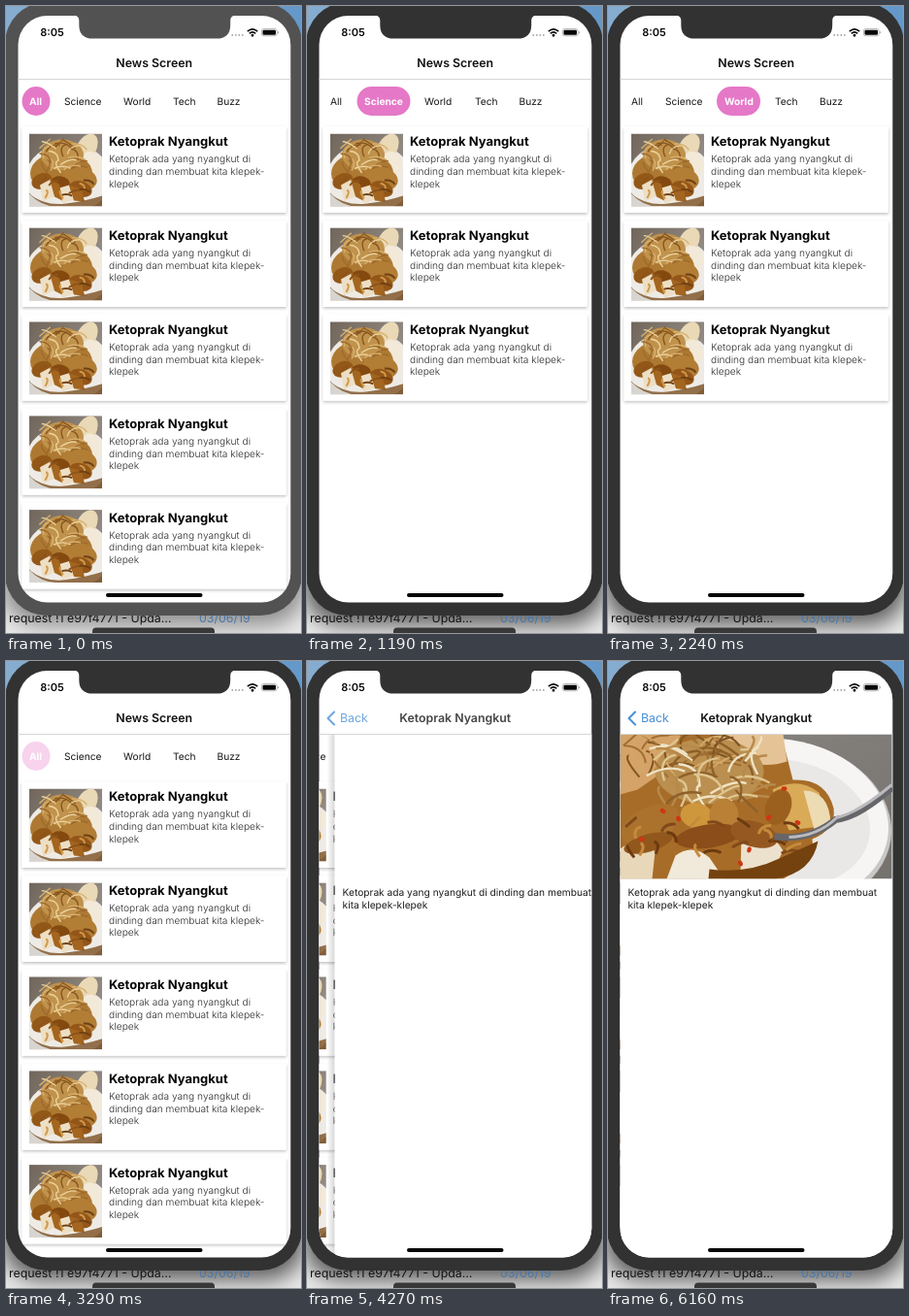
Animation of 304 by 646 pixels, one loop 6230 ms. Source, as an HTML page:

```html
<!DOCTYPE html>
<html lang="id">
<head>
<meta charset="utf-8">
<title>News Screen</title>
<style>
html, body { margin: 0; width: 100%; height: 100%; overflow: hidden; background: #dedede; }
svg { display: block; width: 304px; height: 646px; font-family: Inter, "Liberation Sans", sans-serif; text-rendering: geometricPrecision; }
</style>
</head>
<body>
<svg id="stage" viewBox="0 0 304 646"></svg>
<script>
const LOOP = 6230, STEP = 70;
const LABELS = ['All', 'Science', 'World', 'Tech', 'Buzz'];

// Tab label positions and the pill, per selected tab
const TABS = [
  { x: [24, 60, 121, 172, 217.5], pill: [16.5, 29], cards: 5 },
  { x: [24, 59, 121, 173, 218.5], pill: [51.5, 55], cards: 3 },
  { x: [24, 59, 120, 172, 218], pill: [112, 45], cards: 3 }
];
const TAPS = [
  { tab: 1, down: 700, up: 835 },
  { tab: 2, down: 1330, up: 1465 },
  { tab: 0, down: 3015, up: 3221 }
];
const PUSH = { start: 4038, length: 500, photo: 4760 };

const text = (x, y, size, weight, str, extra = '') =>
  `<text x="${x}" y="${y}" font-size="${size}" font-weight="${weight}" ${extra}>${str}</text>`;
const oval = (x, y, rx, ry, fill, turn = 0) =>
  `<ellipse cx="${x}" cy="${y}" rx="${rx}" ry="${ry}" fill="${fill}" transform="rotate(${turn} ${x} ${y})"/>`;
const each = (n, fn) => Array.from({ length: n }, (_, i) => fn(i)).join('');

// Thin curved strands scattered around a centre
function strands(n, cx, cy, rx, ry, len, width, colors) {
  return each(n, i => {
    const x = cx + rx * Math.sin(i * 2.4), y = cy + ry * Math.cos(i * 1.7);
    const a = i * 1.13, dx = len * Math.cos(a), dy = len * Math.sin(a) * 0.7;
    return `<path d="M${x - dx} ${y - dy}Q${x + dy} ${y - len / 2} ${x + dx} ${y + dy}" fill="none" stroke="${colors[i % colors.length]}" stroke-width="${width}"/>`;
  });
}

const thumb = `
  <rect width="75" height="75" fill="url(#table)"/>
  ${oval(40, 46, 44, 36, '#eeebe6')}
  ${oval(59, 15, 10, 16, '#ead9b6', 28)}
  ${oval(64, 31, 10, 13, '#f2e9d8', -18)}
  ${oval(33, 41, 32, 22, '#ad7932')}
  ${oval(34, 22, 22, 16, '#c0924c')}
  ${oval(52, 46, 18, 12, '#b27d35', 15)}
  ${strands(24, 34, 23, 18, 13, 9, 1.4, ['#ead09a', '#87561f', '#d8b06d', '#9c6a2c'])}
  ${oval(13, 49, 11, 8, '#935818', -20)}
  ${oval(32, 51, 10, 7, '#84490f', 10)}
  ${oval(53, 57, 12, 8, '#945618', 18)}
  <path d="M11 53L22 47L27 64L14 70Z M31 56L41 53L46 68L34 72Z" fill="#eddfc5"/>
  <path d="M21 47L31 52L34 69L26 65Z M41 53L54 57L57 70L46 69Z" fill="#a3651f"/>
  ${strands(9, 38, 56, 24, 8, 6, 2, ['#6f4013', '#cf9a4c', '#8c541b'])}
  <path d="M0 62Q16 75 38 72T75 64V75H0Z" fill="#7c5023" opacity=".8"/>
  <path d="M0 62Q14 77 33 75H0Z" fill="#d8d5d0"/>`;

const photo = `
  <rect width="280" height="149" fill="url(#wood)"/>
  ${oval(166, 93, 114, 87, '#c9c7c5', 8)}
  ${oval(164, 90, 113, 85, '#f6f5f4', 8)}
  ${oval(166, 92, 92, 66, '#eae8e6', 8)}
  <path d="M0 0H166L178 47Q212 45 220 76Q223 98 198 108Q202 130 168 149H0Z" fill="#a76c28"/>
  <path d="M0 0H63L44 39L18 57L0 62Z" fill="#d5a367"/>
  <path d="M98 0H168L172 28Q148 36 126 26Z" fill="#e6c396"/>
  ${oval(92, 38, 56, 34, '#ba8f4f')}
  ${strands(30, 62, 18, 48, 16, 17, 2, ['#7f5422', '#d3a867', '#a06f33'])}
  ${strands(40, 95, 42, 48, 27, 20, 2.4, ['#efe3c4', '#8e602a', '#dfc590', '#b78a4b'])}
  ${oval(31, 93, 32, 18, '#aa722d', -25)}
  ${oval(79, 84, 17, 13, '#cf973c', 12)}
  ${oval(107, 84, 15, 18, '#b98036')}
  <path d="M0 118Q20 103 36 121L33 149H0Z" fill="#e8d7b8"/>
  <path d="M57 125Q74 112 92 127L107 149H48Z" fill="#f1e9d9"/>
  <path d="M125 106Q151 92 168 120L158 140L124 143Z" fill="#ece1cc"/>
  <path d="M157 57Q183 43 205 60L214 94L174 99Z" fill="#d9ab58"/>
  <path d="M189 58Q216 58 217 93L200 98Z" fill="#eddbb3"/>
  ${oval(91, 105, 34, 12, '#8b4d19', -8)}
  ${oval(138, 103, 25, 13, '#945820', 16)}
  ${oval(163, 75, 13, 19, '#9c601e', 20)}
  ${oval(29, 112, 26, 9, '#91571d', -16)}
  ${strands(20, 95, 106, 84, 16, 9, 3, ['#6d3a10', '#c58a3b', '#80491a'])}
  <path d="M92 139Q131 144 164 128L204 110Q198 143 160 149H91Z" fill="#74420f"/>
  <path d="M159 105Q194 111 222 88Q244 86 280 55" fill="none" stroke="#66666a" stroke-width="7"/>
  <path d="M174 106Q204 105 223 86Q247 80 280 52" fill="none" stroke="#b9bbbe" stroke-width="3"/>
  ${each(8, i => oval([22, 44, 60, 133, 153, 169, 183, 124][i], [108, 79, 87, 119, 86, 56, 91, 133][i], 3, 2.2, '#cf3513', i * 35))}`;

const card = i => `
  <g class="card" transform="translate(0 ${i * 96.9})">
    <rect x="16.5" y="124" width="272.5" height="89" rx="1.5" fill="#fff" filter="url(#lift)"/>
    <use href="#thumb" x="24" y="131.5"/>
    ${text(106, 144.3, 13, 700, 'Ketoprak Nyangkut', 'fill="#050505"')}
    <g fill="#2c2c2c">
      ${['Ketoprak ada yang nyangkut di', 'dinding dan membuat kita klepek-', 'klepek']
        .map((line, n) => text(106, 161.2 + n * 12.7, 10.2, 300, line)).join('')}
    </g>
  </g>`;

const stage = document.getElementById('stage');
stage.innerHTML = `
  <defs>
    <linearGradient id="table" x2="1" y2=".6"><stop stop-color="#71665b"/><stop offset="1" stop-color="#98928b"/></linearGradient>
    <linearGradient id="wood" x2="1" y2="1"><stop stop-color="#8a8683"/><stop offset="1" stop-color="#75716d"/></linearGradient>
    <linearGradient id="sky" x2="1"><stop stop-color="#86add0"/><stop offset="1" stop-color="#6498c9"/></linearGradient>
    <linearGradient id="edge"><stop stop-color="#000" stop-opacity="0"/><stop offset="1" stop-color="#000" stop-opacity=".16"/></linearGradient>
    <filter id="lift" x="-5%" y="-10%" width="110%" height="125%"><feDropShadow dx="0" dy="1.6" stdDeviation="1.4" flood-opacity=".24"/></filter>
    <filter id="soft" x="-20%" y="-20%" width="140%" height="140%"><feGaussianBlur stdDeviation="11"/></filter>
    <filter id="blur" x="0" y="0" width="100%" height="100%"><feGaussianBlur stdDeviation=".7"/></filter>
    <clipPath id="screen"><rect x="12.5" y="10" width="280.8" height="604.5" rx="30"/></clipPath>
    <clipPath id="body"><rect x="12" y="76" width="282" height="539"/></clipPath>
    <clipPath id="square"><rect width="75" height="75"/></clipPath>
    <clipPath id="wide"><rect width="281" height="149"/></clipPath>
    <g id="thumb"><g clip-path="url(#square)"><g filter="url(#blur)">${thumb}</g></g></g>
  </defs>
  <rect width="304" height="646" fill="#e9e9e9"/>
  <rect width="304" height="60" fill="url(#sky)"/>
  <rect id="shade" x="-4" y="40" width="312" height="598" rx="40" filter="url(#soft)"/>
  ${text(3, 635.3, 12.4, 400, 'request !1 e97f4771 - Upda…', 'fill="#141414"')}
  ${text(199, 635.3, 12.4, 400, '03/06/19', 'fill="#4777ab"')}
  <rect x="89" y="640.5" width="126" height="12" rx="4" fill="#383838"/>
  <g id="bezel"><rect x="-1" y="-4" width="306" height="632" rx="43"/></g>
  <g clip-path="url(#screen)">
    <rect x="12" y="10" width="282" height="605" fill="#fff"/>
    <g clip-path="url(#body)">
      <g id="list">
        <rect id="pill" y="83" height="30" rx="15" fill="#e578c7"/>
        <g id="tabs">${LABELS.map(name => text(0, 101.6, 10.2, 400, name)).join('')}</g>
        ${each(5, card)}
      </g>
      <g id="detail">
        <rect x="4.5" y="76" width="8" height="540" fill="url(#edge)"/>
        <rect x="12.5" y="76" width="281" height="540" fill="#fff"/>
        <g id="photo" transform="translate(12.5 75.5)" clip-path="url(#wide)"><g filter="url(#blur)">${photo}</g></g>
        <g fill="#1d1d1d">
          ${text(20.5, 242.2, 10.2, 400, 'Ketoprak ada yang nyangkut di dinding dan membuat')}
          ${text(20.5, 254.8, 10.2, 400, 'kita klepek-klepek')}
        </g>
      </g>
    </g>
    <rect x="12" y="75" width="282" height="1" fill="#d6d6d6"/>
    <g text-anchor="middle" fill="#121212">
      ${text(152.7, 63.3, 12.35, 600, 'News Screen', 'id="home"')}
      ${text(152.7, 63.3, 12.35, 600, 'Ketoprak Nyangkut', 'id="title"')}
    </g>
    <g id="back" fill="#468fd8">
      <path d="M28 52.5L21.5 59L28 65.5" fill="none" stroke="#468fd8" stroke-width="2.1" stroke-linecap="round" stroke-linejoin="round"/>
      ${text(34, 63.3, 12.35, 400, 'Back')}
    </g>
    ${text(35.2, 31.1, 11, 600, '8:05', 'fill="#0a0a0a"')}
    <g fill="#a5a5a5">${each(4, i => `<circle cx="${233.3 + i * 3.5}" cy="30" r=".9"/>`)}</g>
    <g fill="none" stroke="#0a0a0a" stroke-width="1.7">
      <path d="M248.8 26.1Q254 21.5 259.2 26.1M250.8 28.3Q254 25.5 257.2 28.3"/>
      <circle cx="254" cy="30.2" r=".6"/>
    </g>
    <rect x="263.4" y="23.6" width="15.7" height="7.2" rx="2.1" fill="#fff" stroke="#999" stroke-width=".7"/>
    <rect x="264.5" y="24.7" width="13.5" height="5" rx="1.3" fill="#050505"/>
    <path d="M280.2 26v2.4q1-.3 1-1.2t-1-1.2" fill="#999"/>
    <rect x="103" y="605" width="99.5" height="4" rx="2" fill="#050505"/>
  </g>
  <path id="notch" d="M70 9.5Q75.3 10 75.3 15V19.5Q75.3 33.6 89.5 33.6H217Q231.2 33.6 231.2 19.5V15Q231.2 10 236.5 9.5Z"/>`;

const $ = id => document.getElementById(id);
const [list, pill, detail, bezel, notch, shade, home, title, back, photoBox] =
  ['list', 'pill', 'detail', 'bezel', 'notch', 'shade', 'home', 'title', 'back', 'photo'].map($);
const labels = [...$('tabs').children];
const cards = [...document.querySelectorAll('.card')];

const clamp = v => Math.max(0, Math.min(1, v));
const easeInOut = v => v < 0.5 ? 2 * v * v : 1 - 2 * (1 - v) ** 2;

// cubic-bezier(.2833, .99, .3183, .99)
function easePush(x) {
  if (x <= 0 || x >= 1) return clamp(x);
  const curve = (s, a, b) => 3 * (1 - s) ** 2 * s * a + 3 * (1 - s) * s * s * b + s ** 3;
  let lo = 0, hi = 1;
  for (let i = 0; i < 24; i++) {
    const mid = (lo + hi) / 2;
    if (curve(mid, 0.2833, 0.3183) < x) lo = mid; else hi = mid;
  }
  return curve(lo, 0.99, 0.99);
}

function tapOpacity(tab, t) {
  const tap = TAPS.find(p => p.tab === tab);
  if (!tap || t < tap.down) return 1;
  if (t < tap.up) return 1 - 0.8 * clamp((t - tap.down) / 60);
  return 0.2 + 0.8 * easeInOut(clamp((t - tap.up) / 250));
}

function draw(t) {
  const selected = TAPS.reduce((tab, tap) => t >= tap.up ? tap.tab : tab, 0);
  const view = TABS[selected];
  pill.setAttribute('x', view.pill[0]);
  pill.setAttribute('width', view.pill[1]);
  pill.setAttribute('opacity', tapOpacity(selected, t));
  labels.forEach((label, i) => {
    const on = i === selected;
    label.setAttribute('x', view.x[i]);
    label.setAttribute('font-weight', on ? 700 : 400);
    label.setAttribute('fill', on ? '#fff' : '#151515');
    label.setAttribute('opacity', on ? 1 : tapOpacity(i, t));
  });
  cards.forEach((c, i) => c.setAttribute('visibility', i < view.cards ? 'visible' : 'hidden'));

  const p = easePush((t - PUSH.start) / PUSH.length);
  list.setAttribute('transform', `translate(${-84 * p} 0)`);
  detail.setAttribute('transform', `translate(${280 * (1 - p)} 0)`);
  detail.setAttribute('visibility', p > 0 ? 'visible' : 'hidden');
  photoBox.setAttribute('display', t >= PUSH.photo ? 'inline' : 'none');
  const shown = clamp(2 * p - 1) ** 2;
  home.setAttribute('opacity', clamp(1 - 2 * p));
  title.setAttribute('opacity', shown);
  back.setAttribute('opacity', shown);

  const active = t >= STEP;
  bezel.setAttribute('fill', active ? '#323232' : '#525252');
  notch.setAttribute('fill', active ? '#323232' : '#525252');
  shade.setAttribute('opacity', active ? 0.6 : 0.4);
}

const start = performance.now();
function tick() {
  const t = (performance.now() - start) % LOOP;
  draw(Math.floor(t / STEP) * STEP);
  requestAnimationFrame(tick);
}
tick();
</script>
</body>
</html>
```
